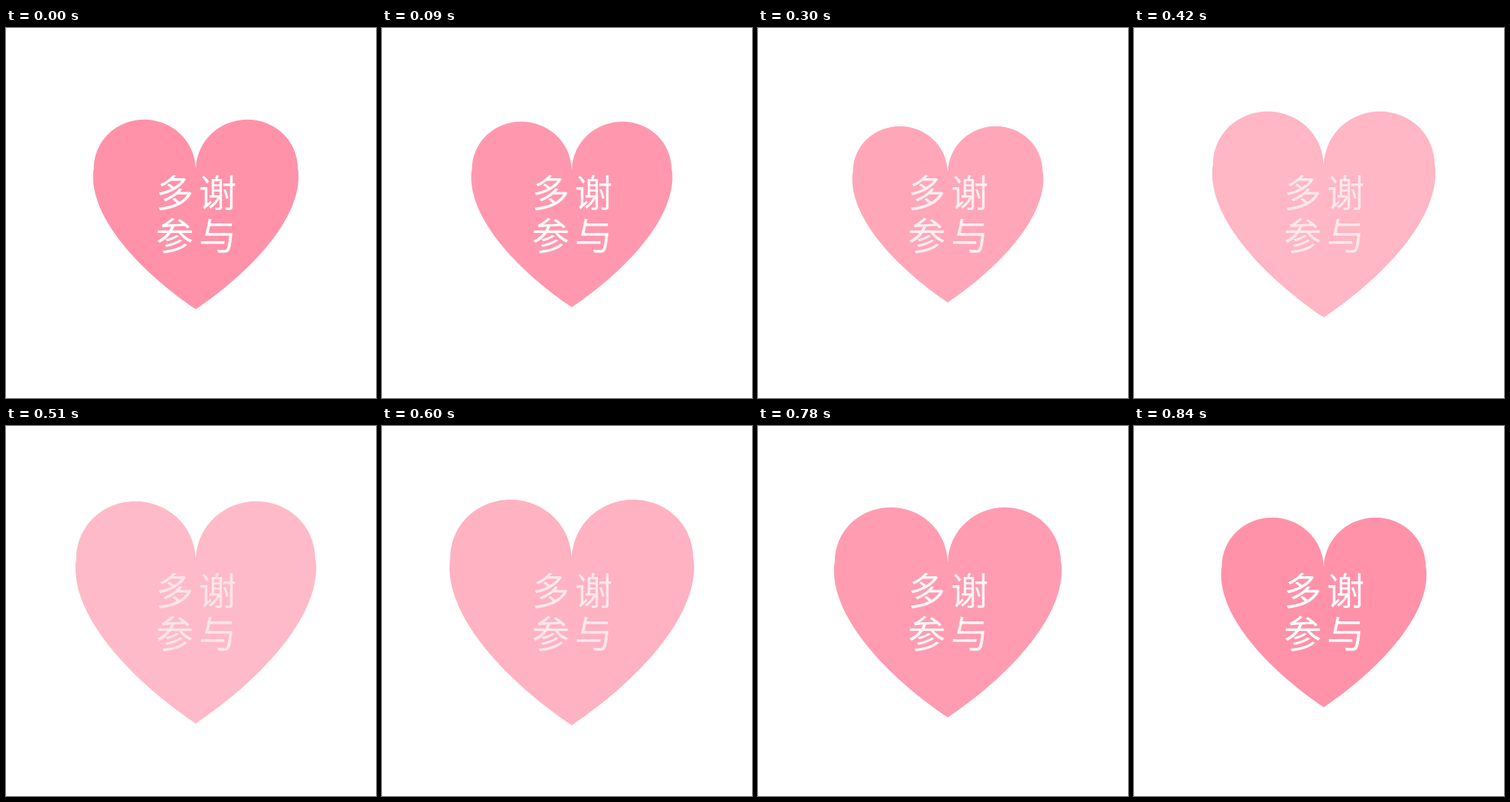
An HTML page with a canvas that plays this animation: 500x500 px, repeating every 1.44 s.

```html
<!DOCTYPE html>
<html lang="zh-CN">
<head>
<meta charset="utf-8">
<style>
  html, body { margin: 0; width: 100%; height: 100%; overflow: hidden; background: #fff; }
  canvas { display: block; width: 500px; height: 500px; }
</style>
</head>
<body>
<canvas id="stage" width="500" height="500"></canvas>
<script>
const ctx = document.getElementById('stage').getContext('2d');
const LOOP = 1440, STEP = 30;
const CENTER = { x: 256.5, y: 251.8 };

// time in ms, heart scale, opacity; rests after the last key
const KEYS = [
  [0, 1, 1],
  [300, 0.93, 0.805],
  [480, 1.165, 0.603],
  [720, 1.216, 0.805],
  [840, 1, 1],
  [LOOP, 1, 1]
];

// left half: lobe, then the side down to the tip
const left = new Path2D(
  'M256.5 190.5 C255 150 222 123.8 187 123.8 C149.5 123.8 118.5 152 118.6 191 ' +
  'L118 193 C112 257 184.5 331.5 256.5 380 Z');
const heart = new Path2D(left);
heart.addPath(left, new DOMMatrix([-1, 0, 0, 1, 2 * CENTER.x, 0]));

const LINES = ['多谢', '参与'];

function pose(t) {
  const i = KEYS.findIndex(k => k[0] > t);
  const a = KEYS[i - 1], b = KEYS[i];
  const p = (t - a[0]) / (b[0] - a[0]);
  const mix = n => a[n] + (b[n] - a[n]) * p;
  return { scale: mix(1), alpha: mix(2) };
}

function draw(t) {
  const { scale, alpha } = pose(t);
  ctx.globalAlpha = 1;
  ctx.fillStyle = '#fff';
  ctx.fillRect(0, 0, 500, 500);

  ctx.globalAlpha = alpha;
  ctx.save();
  ctx.translate(CENTER.x, CENTER.y);
  ctx.scale(scale, scale);
  ctx.translate(-CENTER.x, -CENTER.y);
  ctx.fillStyle = '#ff92a9';
  ctx.fill(heart);
  ctx.restore();

  ctx.fillStyle = '#fff';
  ctx.font = '51px "Noto Sans CJK SC", "Noto Sans CJK", sans-serif';
  ctx.textAlign = 'center';
  LINES.forEach((line, row) => {
    [...line].forEach((ch, col) => ctx.fillText(ch, 228 + 58 * col, 241.5 + 58 * row));
  });
}

const start = performance.now();
function tick() {
  const t = (performance.now() - start) % LOOP;
  draw(Math.floor(t / STEP) * STEP);
  requestAnimationFrame(tick);
}
tick();
</script>
</body>
</html>
```
